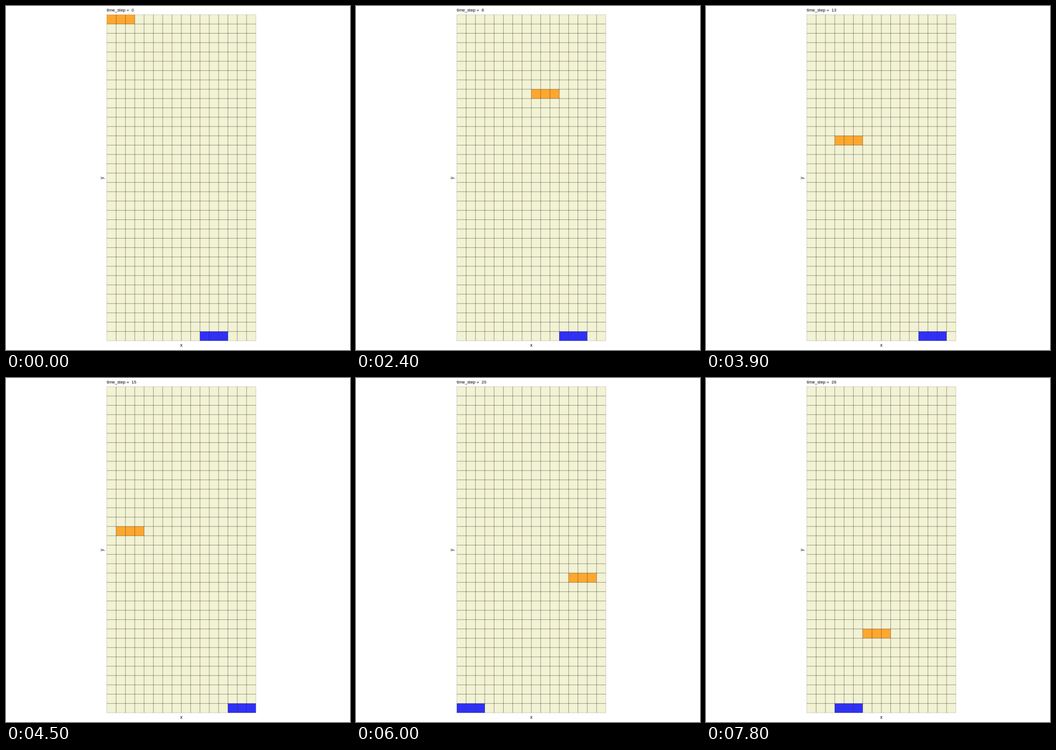
An HTML page for the animation above (8 s loop, 748 by 748 pixels).

```html
<!DOCTYPE html>
<html lang="en">
<head>
<meta charset="utf-8">
<title>Grid game</title>
<style>
  html, body { margin: 0; width: 100%; height: 100%; overflow: hidden; background: #fff; }
  svg { display: block; width: 100vw; height: 100vh; }
  text { font-family: "Liberation Sans", Arial, sans-serif; fill: #000; white-space: pre; }
  .field { fill: #f2f2d4; }
  .ball { fill: #fea72f; }
  .paddle { fill: #3030f6; }
  .lines { stroke: #000; stroke-opacity: .42; fill: none; }
  .frame { stroke: #000; stroke-opacity: .18; fill: none; }
</style>
</head>
<body>
<svg viewBox="0 0 748 748">
  <g id="cells"></g>
  <path id="lines" class="lines"/>
  <rect id="frame" class="frame"/>
  <text id="title" x="219" y="12.2" font-size="9.4"></text>
  <text x="381.2" y="741" font-size="10" text-anchor="middle">x</text>
  <text transform="translate(211.6 374) rotate(-90)" font-size="10" text-anchor="middle">y</text>
</svg>
<script>
const COLS = 16, ROWS = 35, CELL = 20.26, LEFT = 219.2, TOP = 18.9;
const STEP = 300, LOOP = 8000, WIDTH = 3;
// steps at which the paddle moves one column to the right
const ADVANCES = [6, 11, 14, 16, 18, 20, 22, 24, 26];

const byId = id => document.getElementById(id);
const colX = c => LEFT + c * CELL;
const rowY = r => TOP + r * CELL;
const wrap = c => ((c % COLS) + COLS) % COLS;

function addRect(cls, w, h) {
  const rect = document.createElementNS("http://www.w3.org/2000/svg", "rect");
  place(rect, 0, 0, w, h);
  rect.setAttribute("class", cls);
  byId("cells").append(rect);
  return rect;
}

function place(rect, col, row, w = 1, h = 1) {
  const box = { x: colX(col), y: rowY(row), width: w * CELL, height: h * CELL };
  for (const key in box) rect.setAttribute(key, box[key].toFixed(2));
}

const makeBar = cls => Array.from({ length: WIDTH }, () => addRect(cls, 1, 1));
const moveBar = (bar, col, row) =>
  bar.forEach((rect, i) => place(rect, wrap(col + i), row));

addRect("field", COLS, ROWS);
const ball = makeBar("ball");
const paddle = makeBar("paddle");

let d = "";
for (let c = 1; c < COLS; c++) d += `M${colX(c)} ${TOP}V${rowY(ROWS)}`;
for (let r = 1; r < ROWS; r++) d += `M${LEFT} ${rowY(r)}H${colX(COLS)}`;
byId("lines").setAttribute("d", d);
place(byId("frame"), 0, 0, COLS, ROWS);

let shown = -1;
function show(step) {
  if (step === shown) return;
  shown = step;
  moveBar(ball, -step, step);
  moveBar(paddle, 10 + ADVANCES.filter(s => s <= step).length, ROWS - 1);
  byId("title").textContent = `time_step =  ${step}`;
}

const start = performance.now();
function tick() {
  show(Math.floor(((performance.now() - start) % LOOP) / STEP));
  requestAnimationFrame(tick);
}
tick();
</script>
</body>
</html>
```
